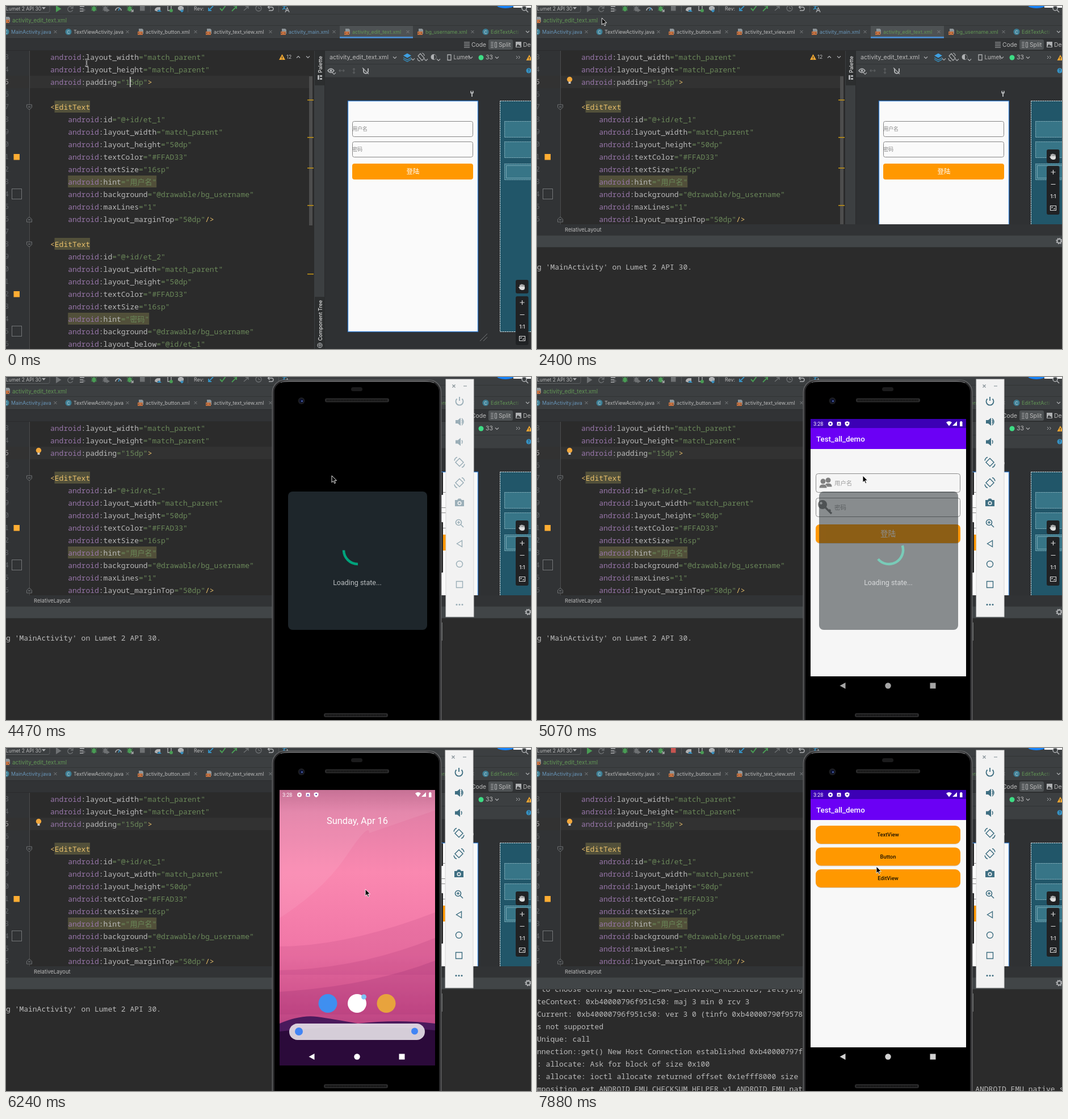
Recreate the animation shown at these times as an HTML page. Size 925 by 605 pixels, loop 8000 ms.

```html
<!DOCTYPE html>
<html lang="en">
<head>
<meta charset="utf-8">
<title>Editor and emulator</title>
<style>
html,body{margin:0;width:100%;height:100%;overflow:hidden;background:#2b2b2b}
svg{position:absolute;left:0;top:0}
text{font-family:Inter,'Noto Sans CJK SC',sans-serif;white-space:pre}
.m{font-family:'Noto Sans Mono','Noto Sans CJK SC',monospace}
.r{font-family:Roboto,'Noto Sans CJK SC',sans-serif}
</style>
</head>
<body>
<svg id="stage" width="925" height="605" viewBox="0 0 925 605"></svg>
<script>
const LOOP = 8000, STEP = 148.7, CH = 7.8;
const GREY = '#6e7173', LIGHT = '#afb1b3', GREEN = '#499c54', BLUE = '#3592c4', ORANGE = '#ff9800';

const esc = s => s.replace(/&/g, '&amp;').replace(/</g, '&lt;');
const R = (x, y, w, h, fill, more = '') => `<rect x="${x}" y="${y}" width="${w}" height="${h}" fill="${fill}" ${more}/>`;
const C = (x, y, r, fill, more = '') => `<circle cx="${x}" cy="${y}" r="${r}" fill="${fill}" ${more}/>`;
const P = (d, stroke, w = 1, more = '') => `<path d="${d}" fill="none" stroke="${stroke}" stroke-width="${w}" ${more}/>`;
const F = (d, fill, more = '') => `<path d="${d}" fill="${fill}" ${more}/>`;
// y is the middle of the line
const T = (x, y, s, size, fill, more = '') =>
  `<text x="${x}" y="${(y + size * .36).toFixed(1)}" font-size="${size}" fill="${fill}" ${more}>${esc(s)}</text>`;
const G = (id, body, more = '') => `<g id="${id}" ${more}>${body}</g>`;
const MID = 'text-anchor="middle"', ROUND = 'stroke-linecap="round" stroke-linejoin="round"';
const chevron = (x, y, c = LIGHT) => P(`M${x - 3} ${y - 1.5}l3 3 3-3`, c, 1.1);

function topBar() {
  let s = R(0, 0, 925, 57, '#3c3f41') + P('M0 14.5H925M0 34.5H925', '#323435');
  s += T(0, 4.5, 'Lumet 2 API 30', 8.6, '#bbbbbb') + F('M63 2h7l-3.5 4z', LIGHT) + P('M-5 11.5H74Q77 11.5 77 8V0', '#5a5d5f');
  s += R(83, -4, 18, 18, '#54585a', 'id="hover" rx="3"') + F('M88 -1l9.500 6-9.500 6z', GREEN, 'id="run"');
  s += P('M117 3a4.500 4.500 0 1 0 .5 4M118 0v4h-4', GREY, 1.3) + P('M130 1h8M130 5h6M130 9h6', LIGHT, 1.4) + P('M137 4v6M134 7h6', GREY, 1.2);
  const bug = (x, c) => `<ellipse cx="${x}" cy="5" rx="3.2" ry="4.500" fill="${c}"/>` + P(`M${x - 5} 1l10 7M${x + 5} 1l-10 7M${x - 5} 5h10`, c, 1);
  s += bug(155, GREEN) + bug(175, GREY) + F('M177 4l6 3.500-6 3.500z', GREY);
  s += P('M193 8a5 5 0 0 1 10 0', LIGHT, 1.6) + P('M198 8l3-5', BLUE, 1.5);
  s += bug(218, GREEN) + P('M220 6l4 4M224 6v4h-4', LIGHT, 1.2) + R(236, 0, 8.500, 8.500, GREY, 'id="stop"');
  s += P('M254.500 0V11M320.500 0V11M480.500 0V11', '#515456');
  s += F('M262 8q0-5 5-6h5v8h-2v-3h-3v3z', LIGHT) + F('M270 6l4 4h-8z', BLUE);
  s += P('M285 -2h6v10h-6z', LIGHT, 1.3) + C(291, 8, 3, GREEN) + F('M303 2l5-3 5 3v4l-5 3-5-3z', LIGHT) + F('M310 5v6m0 0l-3-3h6l-3 3', BLUE, `stroke="${BLUE}"`);
  s += T(331, 4.5, 'Rev:', 8.8, '#bbbbbb');
  s += P('M365 0l-8 8M357 3v5h5', BLUE, 1.8) + P('M377 4l3.500 4 6-8', GREEN, 2) + P('M398 9l8-8M401 0h5v5', GREEN, 1.8);
  s += P('M419 8l8-7M422 1h5v4', GREY, 1.3) + C(445, 4, 5, 'none', `stroke="${GREY}" stroke-width="1.300"`) + P('M445 1v3.500h3', GREY);
  s += P('M463 8h5a3 3 0 0 0 0-6h-6M464.500 -1l-3 3 3 3', LIGHT, 1.4);
  s += P('M487 0h8M491 -2v2q0 4-4 6M489 2q2 3 4 4', BLUE, 1.4) + P('M492 11l3.500-8 3.500 8M493.500 8h4', LIGHT, 1.3);
  s += `<ellipse cx="880" cy="-1" rx="15" ry="5" fill="#1683fb"/>` + R(894, 0, 31, 3, '#fff') + C(913, 4, 4, '#3c3f41', `stroke="${LIGHT}" stroke-width="1.500"`) + P('M916 7l4 4', LIGHT, 1.6);
  s += fileIcon(-3, 25) + T(11, 25.5, 'activity_edit_text.xml', 9.9, '#629755');
  return s + tabs();
}

function fileIcon(x, y) {
  return F(`M${x + 2} ${y - 6}h6l2 2v7h-8z`, '#8d9599') + R(x, y - 1, 9, 6, '#c4703f') + P(`M${x + 2} ${y + 1}l-1 1 1 1M${x + 7} ${y + 1}l1 1-1 1`, '#3c3f41', .9);
}

function tabs() {
  const blue = '#6897bb', green = '#629755', plain = '#bbbbbb';
  const list = [[-1, 'MainActivity.java', blue, 87, 1], [109, 'TextViewActivity.java', plain, 214, 1], [236, 'activity_button.xml', plain, 334],
    [356, 'activity_text_view.xml', plain, 466], [488, 'activity_main.xml', blue, 578], [600, 'activity_edit_text.xml', green, 708],
    [729, 'bg_username.xml', green, 822], [844, 'EditTextActi', green, 0, 1]];
  let s = R(588, 35, 129, 22, '#4e5254') + R(588, 54, 129, 3, '#4a88c7');
  for (const [x, name, color, close, cls] of list) {
    s += cls ? C(x + 1, 45.5, 5.5, '#3e7f95') + T(x + 1, 45.8, 'C', 7.5, '#c9dde4', MID) : fileIcon(x - 4, 46);
    s += T(x + 10, 46, name, 8.85, color);
    if (close) s += P(`M${close - 2.5} 43l5 5m0-5l-5 5`, '#7d8082');
  }
  return s + R(893, 36, 14, 19, 'url(#fade)') + chevron(919, 45.5);
}

function viewBar() {
  return R(0, 57, 925, 22, '#313335') + P('M0 57.500H925M0 78.500H925', '#2a2b2c')
    + P('M807 64h10M807 67h10M807 70h10M807 73h10', LIGHT, 1) + T(820, 68, 'Code', 10.3, '#bbbbbb')
    + R(850, 59, 43, 18, '#4e5254', 'rx="3"') + P('M854 64h5M854 67h5M854 70h5M854 73h5', LIGHT) + P('M861.500 64h3v9h-3z', LIGHT) + T(868, 68, 'Split', 10.3, '#bbbbbb')
    + R(898, 63, 10, 10, LIGHT) + F('M899 72l3-5 2 3 1-1 2 3z', '#313335') + T(911, 68, 'Design', 10.3, '#bbbbbb');
}

const field = (id, hint, bottom) => ['<EditText', ` id|@+id/${id}`, ' layout_width|match_parent', ' layout_height|50dp', ' textColor|#FFAD33',
  ' textSize|16sp', ` hint|${hint}`, ' background|@drawable/bg_username', ...bottom];
const CODE = ['layout_width|match_parent', 'layout_height|match_parent', 'padding|15dp|>', '',
  ...field('et_1', '用户名', [' maxLines|1', ' layout_marginTop|50dp|/>', '']), ...field('et_2', '密码', [' layout_below|@id/et_1'])];

function editor() {
  let s = R(0, 79, 543, 526, '#2b2b2b') + R(0, 79, 42, 526, '#313335') + R(0, 123, 540, 22, '#323232') + P('M41.500 79V605', '#4b4d4e');
  CODE.forEach((line, i) => {
    const y = 90 + 22 * i, mono = 'class="m"';
    s += T(5, y, String((3 + i) % 10), 12, i === 2 ? '#a4a3a3' : '#606366', `${mono} text-anchor="end"`);
    if (!line) return;
    if (line[0] === '<') {
      s += R(85.5, y - 11, 62.5, 21, '#52503a') + T(78, y, line, 13, '#e8bf6a', mono);
      s += F(`M36.500 ${y - 4}h9v5l-4.500 4-4.500-4z`, '#313335', 'stroke="#6d6f70"') + P(`M39 ${y}h4`, '#85888a');
      return;
    }
    const [name, value, end = ''] = line.trim().split('|'), x = line[0] === ' ' ? 109.2 : 78;
    if (name === 'hint') s += R(x, y - 11, 15 * CH + 13 * value.length, 21, '#52503a');
    if (name === 'textColor') s += R(13.5, y - 5, 10.5, 10.5, '#ffad33');
    if (name === 'background') s += R(10.5, y - 9.5, 17, 18, 'none', 'stroke="#737678"');
    if (end === '/>') s += F(`M36.500 ${y + 5}h9v-5l-4.500-4-4.500 4z`, '#313335', 'stroke="#6d6f70"') + P(`M39 ${y + 1}h4`, '#85888a');
    const base = (y + 4.7).toFixed(1), span = (c, v) => `<tspan fill="${c}">${esc(v)}</tspan>`;
    s += `<text class="m" x="${x}" y="${base}" font-size="13">` + span('#9876aa', 'android') + span('#bababa', ':' + name)
      + span('#6a8759', `="${value}"`) + span('#e8bf6a', end) + '</text>';
  });
  s += R(218, 125, 1.7, 18, '#d0d0d0', 'id="caret"');
  s += G('bulb', C(57.500, 129.500, 4.700, '#f2a73b') + R(55.500, 133.500, 4, 3.500, '#c9c9c9'));
  s += R(534, 124, 6, 263, '#4d4d4d');
  for (const y of [166, 232, 286, 352, 473]) s += R(531, y - 1, 11, 1.6, '#be9117');
  s += warning(486.500, 90) + T(494, 90, '12', 9, '#bbbbbb') + P('M512 91.500l3-3 3 3', LIGHT, 1.2) + chevron(532, 90);
  return s;
}

const warning = (x, y) => F(`M${x} ${y - 5}l5.500 10h-11z`, '#f0a732') + P(`M${x} ${y - 1}v3m0 1v1`, '#2b2b2b', 1.2);

function design() {
  let s = R(543, 79, 19, 526, '#3c3f41') + R(544, 79, 17, 61, '#2c2e2f') + R(544, 513, 17, 92, '#2c2e2f') + P('M542.500 79V605M561.500 79V605', '#2a2b2c');
  const side = (y, t, size) => `<text transform="translate(556.500 ${y}) rotate(-90)" font-size="${size}" font-weight="500" fill="#e4e4e4">${t}</text>`;
  s += side(118, 'Palette', 9) + side(590.500, 'Component Tree', 9);
  s += R(549, 122, 3, 8, LIGHT) + R(553, 122, 4, 3, LIGHT) + R(553, 127, 4, 3, LIGHT) + C(553, 598.500, 4, 'none', `stroke="${LIGHT}" stroke-width="1.200"`) + P('M550 598h6M553 595v7', LIGHT);
  s += R(562, 79, 363, 47, '#3c3f41') + P('M562 102.500H925M562 126H925', '#313335') + R(562, 126, 363, 479, '#2f3133');
  s += T(570, 90.5, 'activity_edit_text.xml', 10.7, '#bbbbbb') + chevron(685, 91);
  s += F('M707 83.500l7 4-7 4-7-4z', '#3f9fe0') + P('M700 91l7 4 7-4M700 94l7 4 7-4', BLUE, 1.4) + chevron(717, 94);
  s += P('M726 88l4-4 7 8-4 4zM725 92q0 5 5 5M737 88q0-4-4-5', LIGHT, 1.2) + chevron(740, 95);
  s += C(753.500, 90, 5, LIGHT) + F('M754 86a4 4 0 0 1 0 8z', '#3c3f41') + chevron(762, 95);
  s += P('M778 86h6v9.500h-6z', LIGHT, 1.3) + T(788.5, 90.5, 'Lumet', 9.8, '#bbbbbb') + chevron(819, 91);
  s += C(837, 91, 4.500, '#3ddc84') + T(845, 90.5, '33', 10.5, '#bbbbbb') + chevron(865, 91);
  s += P('M899 88l2.500 2.500-2.500 2.500M903 88l2.500 2.500-2.500 2.500', LIGHT) + warning(922, 91);
  s += P('M567 114q5.500-7 11 0q-5.500 7-11 0z', LIGHT, 1.4) + C(572.500, 114, 2, LIGHT) + chevron(578, 119);
  s += P('M587 114h9M589 112l-2 2 2 2M594 112l2 2-2 2M613 110v9M611 112l2-2 2 2M611 117l2 2 2-2', '#5d6062', 1.2);
  s += P('M630 110v5a4 4 0 0 0 8 0v-5', LIGHT, 2) + P('M628 109l11 11', LIGHT, 1.2) + C(921, 114, 4.500, BLUE) + T(921, 114, '?', 7, '#2b2b2b', MID);
  s += C(821, 152, 3, LIGHT) + R(820, 149, 2, 3, '#2f3133') + R(820, 153, 2, 7, LIGHT);
  s += R(602.5, 167.500, 229, 407, '#fafafa', 'stroke="#2f7bd0" stroke-width="1.300"');
  const box = (y, t) => R(610.5, y + .5, 212, 27, '#fafafa', 'rx="3" stroke="#858585"') + T(610.5, y + 14, t, 8.8, '#858585');
  s += box(203, '用户名') + box(239, '密码') + R(610, 278, 213, 28, ORANGE, 'rx="4"') + T(717, 292, '登陆', 11.4, '#fff', MID);
  s += P('M835 591l13-13M841 591l7-7', '#77797b');
  s += R(870.500, 167.500, 80, 407, '#215669', 'stroke="#d5e3e8" stroke-dasharray="3 1"');
  for (const y of [203, 239, 278]) s += R(878.500, y + .5, 70, 28, '#377587', 'stroke="#91bac6" stroke-dasharray="2 1"');
  return s + P('M925 281.500H881.500V303.500H925', '#78a6b3');
}

function lowerPane() {
  const log = [' to choose config with EGL_SWAP_BEHAVIOR_PRESERVED, retrying without...', 'teContext: 0xb40000796f951c50: maj 3 min 0 rcv 3',
    'Current: 0xb40000796f951c50: ver 3 0 (tinfo 0xb40000790f9578', 's not supported', 'Unique: call',
    'nnection::get() New Host Connection established 0xb40000797f', ': allocate: Ask for block of size 0x100',
    ': allocate: ioctl allocate returned offset 0x1efff8000 size ',
    'mposition_ext ANDROID_EMU_CHECKSUM_HELPER_v1 ' + [2, 3, 4].map(n => 'ANDROID_EMU_native_sync_v' + n).join(' ')];
  const row = (y, s) => T(0, y, s, 13, '#bbbbbb', 'class="m"');
  return R(0, 385, 925, 220, '#2b2b2b') + R(0, 385, 925, 19, '#313335') + T(49, 394.5, 'RelativeLayout', 9.4, '#bbbbbb')
    + R(0, 404, 925, 22, '#414547') + P('M0 404.500H925M0 425.500H925', '#333536')
    + C(920, 414.500, 3.500, 'none', `stroke="${LIGHT}" stroke-width="2"`) + C(920, 414.500, 5, 'none', `stroke="${LIGHT}" stroke-width="1.500" stroke-dasharray="2 1.900"`)
    + G('launch', row(460, "g 'MainActivity' on Lumet 2 API 30."))
    + `<g clip-path="url(#console)">${G('log', log.map((s, i) => row(425 + 22 * i, s)).join(''))}</g>`;
}

function zoomBox() {
  const hand = [0, 1, 2, 3].map(i => P(`M${906 + i * 2.2} ${491 + Math.abs(i - 1.4)}v7`, '#ddd', 1.6, ROUND)).join('');
  return R(898, 483, 22.500, 24, '#202224', 'rx="3"') + hand + F('M905 495h9v3q-1 3-3 3h-3q-2-1-5-5z', '#ddd')
    + R(898, 512, 22.500, 86, '#202224', 'rx="3"') + P('M905.500 523h8M909.500 519v8M905.500 544.500h8', '#ddd', 1.2)
    + T(909.5, 565.5, '1:1', 8.500, '#ddd', `${MID} font-weight="600"`) + P('M904.500 582.500h10v8h-10zM907 587v-2h2M912 586v2h-2', '#ddd', 1.1);
}

function phoneBody() {
  const grill = (x, y) => R(x, y, 113, 7, '#2a2a2b', 'rx="3"') + P(`M${x + 3} ${y + 3.500}h107`, '#0d0d0d', 3, 'stroke-dasharray="1.500 1"');
  return R(766, 168, 4, 40, '#252526', 'rx="1"') + R(766, 256, 4, 89, '#252526', 'rx="1"') + P('M768.500 433V465', '#77797a')
    + R(469.5, 5.500, 297, 640, '#0a0a0a', 'rx="21" stroke="#5e5f61" stroke-width="2"')
    + R(472, 8, 292, 640, '#000', 'rx="18" stroke="#29292b" stroke-width="2"') + P('M484 9.500Q490 7.500 500 7.500H738Q748 7.500 754 10', '#8b8c8e', 1.2)
    + grill(562, 37.500) + grill(560, 593) + R(608, 18, 20, 7, '#1c1c1d', 'rx="3.500"')
    + C(520.500, 42, 6, '#1b1c20') + C(520.500, 42, 3.500, '#0b1030') + C(521.500, 42.500, 1.300, '#5b78c8');
}

function appBase(title) {
  return R(482, 74, 274, 486, '#000') + R(482, 74, 274, 16, '#3c00b5') + R(482, 90, 274, 37, '#6b00f5') + R(482, 127, 274, 401, '#f8f8f8')
    + (title ? T(492, 109, 'Test_all_demo', 13.3, '#fff', 'class="r" font-weight="500"') : '');
}

function screens() {
  const box = (y, t) => R(491.5, y + .5, 254, 33, '#f5f5f5', 'rx="4" stroke="#8b8b8b"') + T(524, y + 17, t, 10.4, '#9b9b9b', 'class="r"');
  const head = (x, y) => C(x, y, 4.500, '#808080') + F(`M${x - 7} ${y + 12}q0-7 7-7t7 7z`, '#808080', 'stroke="#f5f5f5" stroke-width=".8"');
  let edit = appBase(1) + R(482, 127, 274, 401, '#f6f6f6') + box(170, '用户名') + box(213, '密码')
    + head(513, 182) + head(504, 184) + C(503, 225, 8, '#808080') + C(500.500, 222.500, 2.200, '#f5f5f5') + P('M507 229l12 12M514 237l3-3', '#808080', 3.500)
    + R(491, 260.500, 255, 33.500, '#d8d8d8', 'rx="7"') + R(491, 260, 255, 33, ORANGE, 'rx="7"') + T(618.5, 276.5, '登陆', 13.6, '#fff', `class="r" ${MID}`);
  let list = appBase(1);
  ['TextView', 'Button', 'EditView'].forEach((t, i) => {
    const y = 137 + 38.500 * i;
    list += R(491, y + 1, 255, 32, '#d2d2d2', 'rx="9"') + R(491, y, 255, 32, ORANGE, 'rx="9"') + T(618.5, y + 16, t, 9.4, '#1a1200', `class="r" ${MID} font-weight="500"`);
  });
  const splash = R(482, 74, 274, 486, '#000') + R(482, 74, 274, 16, '#6a1bc8') + R(482, 90, 274, 438, '#fff');
  const home = R(482, 74, 274, 486, 'url(#sky)')
    + F('M482 300Q560 250 600 190T640 150L756 110V74H482z', '#fff', 'opacity=".07"') + F('M482 350Q600 350 756 290V400H482z', '#b03a78', 'opacity=".16"')
    + F('M482 392Q620 390 756 335V470H482z', '#a02c70', 'opacity=".18"') + F('M482 430Q640 420 756 375V490H482z', '#8a2468', 'opacity=".2"')
    + F('M482 486Q520 470 548 474T620 486Q690 478 756 486V560H482z', '#4a1a5c') + F('M482 500Q620 484 756 498V560H482z', '#2b0a3a')
    + T(619, 128.5, 'Sunday, Apr 16', 16.4, '#fff', `class="r" ${MID}`)
    + C(567, 450.500, 16.500, '#3f8ff0') + C(618.500, 450.500, 16.500, '#fff') + C(670, 450.500, 16.500, '#e8a33d') + C(630.500, 439, 4.500, '#7fc4f3')
    + R(499, 486, 239, 29, '#f4f0f4', 'rx="14.500" opacity=".85"') + C(516, 500, 7, '#4285f4') + C(720, 499.500, 6, '#4285f4');
  const status = T(487, 82.5, '3:28', 9, '#fff', 'class="r"') + C(517, 82.500, 2.800, 'none', 'stroke="#fff" stroke-width="2.400"')
    + R(528.500, 79, 7, 7, '#fff', 'rx="1"') + P('M530.500 85l1.500-4 1.500 4', '#5a20a0') + F('M546.500 78l4 1.500v3q-.5 3-4 4.500q-3.500-1.500-4-4.500v-3z', '#fff') + C(546.500, 82, 1.300, '#5a20a0')
    + F('M721 80q5-4 10 0l-5 6.500z', '#fff') + F('M740 78v8h-8z', '#fff') + R(745, 79, 4.500, 8, '#fff') + R(746, 78, 2.500, 1.500, '#fff');
  const nav = F('M543.500 539v11l-10-5.500z') + C(618.500, 544.500, 5.200) + R(692.500, 539.500, 10, 10);
  return G('home', home) + G('edit', edit) + G('splash', splash) + G('list', list) + G('status', status) + G('nav', nav.replace(/fill="undefined"/g, ''))
    + G('dialog', R(497, 202, 245, 244, '#1e262b', 'rx="8"') + P('', '#00a37c', 4.500, 'id="spin"') + T(619, 362, 'Loading state...', 12.5, '#b9bdbf', `class="r" ${MID}`));
}

function strip() {
  const tilt = P('M0 -7l7 7-7 7-7-7zM-9 -3q1-5 5-6M9 3q-1 5-5 6', 'currentColor', 1.5);
  const at = (y, body) => `<g transform="translate(798 ${y})">${body}</g>`, ink = 'currentColor';
  const horn = 'M-7 -3h4l5-4v14l-5-4h-4z';
  return R(774, 4, 49, 419, '#f2f2f2', 'stroke="#d6d6d6"') + at(16, P('M-12.500 -2.500l5 5m0-5l-5 5M7 0h6', '#7d8a90', 1.1))
    + at(43, P('M-4.500 -4.500a6.500 6.500 0 1 0 9 0M0 -8v7', ink, 1.8)) + at(79, F(horn, ink) + P('M4 -3q2 3 0 6M4 -6q6 6 0 12', ink, 1.5))
    + at(114.500, F(horn, ink) + P('M4 -3q2 3 0 6', ink, 1.5)) + at(150.500, tilt) + at(186.500, `<g transform="scale(-1 1)">${tilt}</g>`)
    + at(222, F('M-8 -5h4l2-2.500h4l2 2.500h4v11h-16z', ink) + C(0, .5, 3.500, '#f2f2f2') + C(0, .5, 2, ink))
    + at(258, C(-1.500, -1.500, 5, 'none', `stroke="${ink}" stroke-width="1.600"`) + P('M2 2l5 5M-4 -1.500h5M-1.500 -4v5', ink, 1.5))
    + at(294, P('M4.500 -5.500v11l-9-5.500z', ink, 1.4)) + at(330, C(0, 0, 5.500, 'none', `stroke="${ink}" stroke-width="1.400"`))
    + at(366, P('M-5.500 -5.500h11v11h-11z', ink, 1.4)) + at(401.500, C(-5, 0, 1.500, ink) + C(0, 0, 1.500, ink) + C(5, 0, 1.500, ink));
}

const sky = [[0, '#c2668d'], [.08, '#e27fa6'], [.3, '#fa88b0'], [.6, '#f075a6'], [.8, '#d5558f'], [1, '#a03a7c']];
const stage = document.getElementById('stage');
stage.innerHTML = `<defs><linearGradient id="sky" x2="0" y2="1">${sky.map(([o, c]) => `<stop offset="${o}" stop-color="${c}"/>`).join('')}</linearGradient>
  <linearGradient id="fade"><stop stop-color="#3c3f41" stop-opacity="0"/><stop offset="1" stop-color="#3c3f41"/></linearGradient>
  <clipPath id="console"><path d="M0 426H925V605H0z"/></clipPath></defs>`
  + topBar() + viewBar() + editor() + design() + G('pane', lowerPane()) + G('zoom', zoomBox())
  + G('phone', phoneBody() + screens()) + G('strip', strip())
  + G('arrow', F('M0 0v12l2.800-2.600 1.900 4.300 1.900-.8-1.900-4.200h3.800z', '#000', 'stroke="#fff" stroke-width=".9"'))
  + G('beam', P('M-2.500 -6q2.500 0 2.500 2v8q0 2-2.500 2M2.500 -6q-2.500 0-2.500 2M2.500 6q-2.500 0-2.500-2', '#fff', 2.2) + P('M-2.500 -6q2.500 0 2.500 2v8q0 2-2.500 2M2.500 -6q-2.500 0-2.500 2M2.500 6q-2.500 0-2.500-2', '#111', 1));

const ui = {};
stage.querySelectorAll('[id]').forEach(e => ui[e.id] = e);
const set = (id, k, v) => ui[id].setAttribute(k, v);
const alpha = (id, a) => { set(id, 'opacity', a); set(id, 'visibility', a > 0 ? 'visible' : 'hidden'); };
const ramp = (t, from, ms) => Math.min(1, Math.max(0, (t - from) / ms));
const zoomAt = (id, s) => set(id, 'transform', `translate(619 317) scale(${s}) translate(-619 -317)`);

const POINTER = [[0, 142, 100], [1040, 56, 6], [1300, 56, 6], [1480, 92, 8], [2230, 92, 8], [2974, 305, 133],
  [3420, 530, 98], [4200, 574, 174], [5600, 574, 174], [6550, 652, 273], [7420, 652, 273], [7880, 598, 209]];

function pointer(t) {
  let i = 0;
  while (i < POINTER.length - 2 && t >= POINTER[i + 1][0]) i++;
  const [t0, x0, y0] = POINTER[i], [t1, x1, y1] = POINTER[i + 1];
  let k = ramp(t, t0, t1 - t0);
  k = k * k * (3 - 2 * k);
  return [x0 + (x1 - x0) * k, y0 + (y1 - y0) * k];
}

function draw(t) {
  const open = t >= 2350, live = t >= 4750, done = t >= 7200;
  const [x, y] = pointer(t), beam = !open && y > 80;
  for (const id of ['arrow', 'beam']) set(id, 'transform', `translate(${x.toFixed(1)} ${y.toFixed(1)})`);
  alpha('arrow', beam ? 0 : 1);
  alpha('beam', beam ? 1 : 0);

  alpha('caret', !open && Math.floor((t + 14) / 500) % 2 === 0 ? 1 : 0);
  alpha('bulb', open ? 1 : 0);
  alpha('hover', t > 1450 && !open ? 1 : 0);
  set('run', 'fill', t > 1900 && !done ? GREY : GREEN);
  set('stop', 'fill', done ? '#c75450' : GREY);

  alpha('pane', open ? 1 : 0);
  set('zoom', 'transform', `translate(0 ${open ? -230 : 0})`);
  const rows = Math.ceil(8 * (1 - ramp(t, 7250, 400)));
  alpha('launch', open && t < 7250 ? 1 : 0);
  alpha('log', t >= 7250 ? 1 : 0);
  set('log', 'transform', `translate(0 ${22 * rows})`);

  const shown = t >= 2600 ? 1 : 0;
  alpha('phone', shown);
  alpha('strip', shown);
  set('strip', 'transform', `translate(${live ? 0 : 1} 0)`);
  set('strip', 'color', live ? '#3f6f82' : '#9bafb8');

  const fadeIn = ramp(t, 2930, 450), dlg = fadeIn * (1 - ramp(t, 4780, 560));
  alpha('dialog', dlg);
  const a0 = 180 + (t - 2974) * 630 / 1487, len = 127 + 38 * Math.cos((t - 2974) / 1487 * 3 * Math.PI);
  const pt = a => [620 + 25 * Math.cos(a * Math.PI / 180), 305 + 25 * Math.sin(a * Math.PI / 180)].map(v => v.toFixed(2)).join(' ');
  set('spin', 'd', `M${pt(a0)}A25 25 0 0 1 ${pt(a0 + len)}`);

  const close = ramp(t, 5750, 300), grow = ramp(t, 6887, 300);
  alpha('home', live && close > 0 && !done ? 1 : 0);
  alpha('edit', live ? 1 - close : 0);
  zoomAt('edit', 1 - .1 * close);
  alpha('splash', done ? 0 : Math.min(1, grow * 1.8));
  zoomAt('splash', .8 + .2 * grow);
  alpha('list', done ? 1 : 0);
  alpha('status', live ? 1 : 0);
  alpha('nav', live ? 1 : 0);
  set('nav', 'fill', done ? '#d2d2d2' : close > .5 ? '#fff' : '#a6a6a6');
  ui.nav.querySelectorAll('*').forEach(e => e.removeAttribute('fill'));
}

const start = performance.now();
function tick(now) {
  const t = Math.max(0, now - start) % LOOP;
  draw(Math.floor(t / STEP + .08) * STEP);
  requestAnimationFrame(tick);
}
draw(0);
requestAnimationFrame(tick);
</script>
</body>
</html>
```
